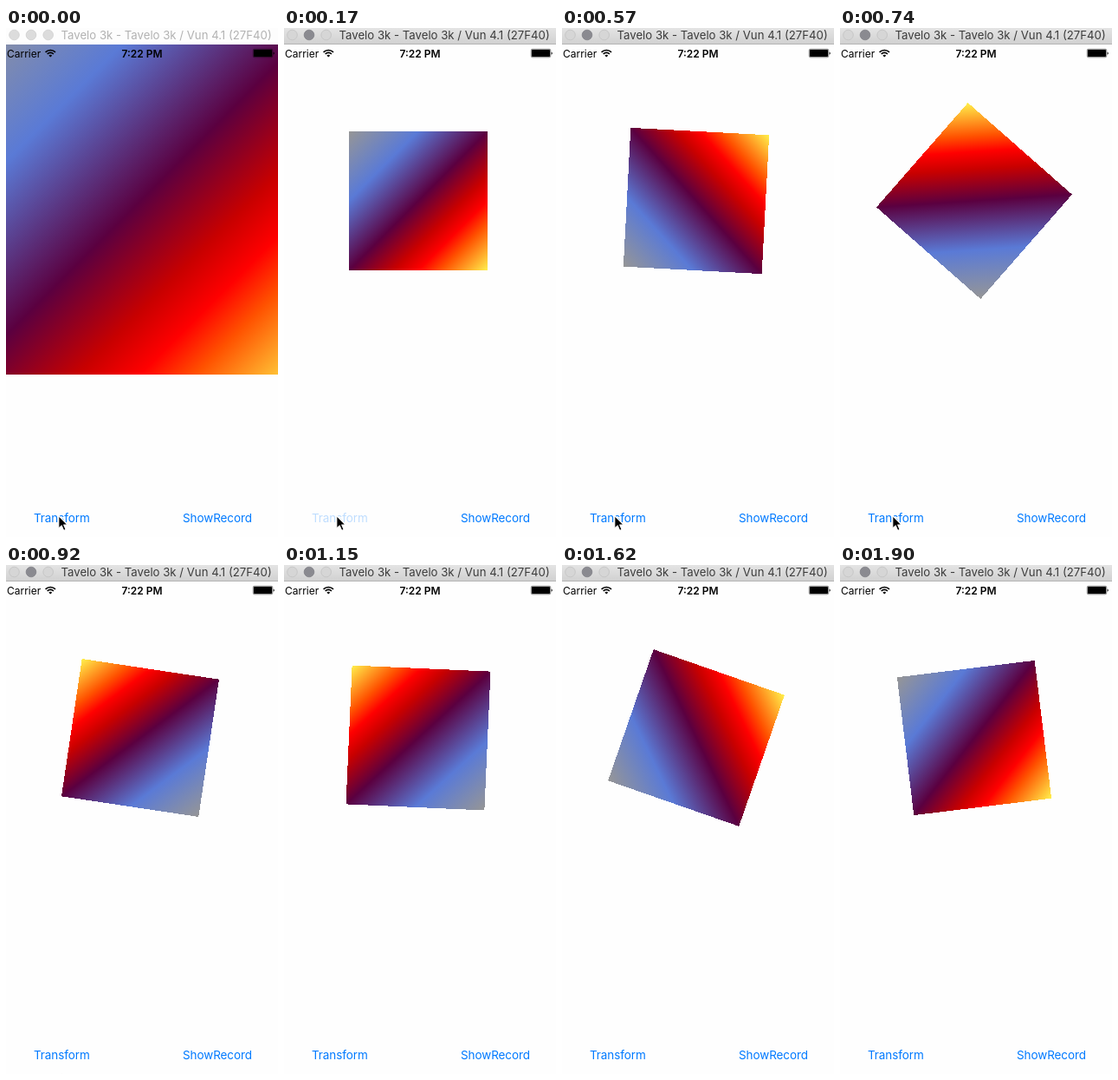
An HTML page for the animation above (2 s loop, 314 by 586 pixels).

```html
<!DOCTYPE html>
<html lang="en">
<head>
<meta charset="utf-8">
<title>Gradient transform</title>
<style>
  html, body { margin: 0; width: 100%; height: 100%; overflow: hidden; background: #fff; }
  svg { display: block; width: 314px; height: 586px; }
  text { font-family: Inter, "Liberation Sans", sans-serif; font-size: 12px; white-space: pre; }
  .title { font-size: 13.2px; fill: #b2b2b2; }
  .clock { font-weight: 600; text-anchor: middle; }
  .button { font-size: 13.5px; letter-spacing: -.1px; fill: #007aff; }
  .lights circle { fill: #dcdcdc; stroke: #d0d0d0; stroke-width: .8; }
  .bar { fill: #fdfdfd; }
  .rule { fill: none; }

  .active .bar { fill: url(#chrome); }
  .active .rule { fill: #b4b4b4; }
  .active .title { fill: #3c3c3c; }
  .active .lights circle { fill: #d6d6d6; stroke: #c2c2c2; }
  .active .lights .mid { fill: #8a8a90; stroke: #828288; }
</style>
</head>
<body>
<svg id="stage" viewBox="0 0 314 586">
  <defs>
    <linearGradient id="colors" x1="0" y1="0" x2="1" y2="1">
      <stop offset="0" stop-color="#969696"/>
      <stop offset=".25" stop-color="#5a7ad6"/>
      <stop offset=".5" stop-color="#5b0040"/>
      <stop offset=".66" stop-color="#c80000"/>
      <stop offset=".75" stop-color="#f00"/>
      <stop offset=".83" stop-color="#ff5200"/>
      <stop offset="1" stop-color="#fff04c"/>
    </linearGradient>
    <linearGradient id="chrome" x1="0" y1="0" x2="0" y2="1">
      <stop offset="0" stop-color="#e4e4e4"/>
      <stop offset="1" stop-color="#d0d0d0"/>
    </linearGradient>
  </defs>

  <rect width="314" height="586" fill="#fefefe"/>
  <rect id="square" x="-80" y="-80" width="160" height="160" fill="url(#colors)" shape-rendering="crispEdges"/>

  <rect class="bar" width="314" height="19"/>
  <rect class="rule" y="18" width="314" height="1"/>
  <g class="lights">
    <circle cx="9.5" cy="8" r="5.8"/>
    <circle class="mid" cx="29" cy="8" r="5.8"/>
    <circle cx="48.7" cy="8" r="5.8"/>
  </g>
  <text class="title" x="63.5" y="13">Tavelo 3k - Tavelo 3k / Vun 4.1 (27F40)</text>

  <text x="1" y="33.5">Carrier</text>
  <g fill="none" stroke="#000" stroke-width="1.7">
    <path d="M45.6 27.9a8 8 0 0 1 11.4 0"/>
    <path d="M47.7 30a5 5 0 0 1 7.2 0"/>
    <path d="M51.3 33.6l-1.9-1.9a2.7 2.7 0 0 1 3.8 0z" fill="#000" stroke="none"/>
  </g>
  <text class="clock" x="157" y="33.5">7:22 PM</text>
  <rect x="285.25" y="24.25" width="22.5" height="9.5" rx="1.6" fill="none" stroke="#000" stroke-width=".5"/>
  <rect x="286" y="25" width="21" height="8" rx=".8"/>
  <path d="M308.6 27.4a1.8 1.8 0 0 1 0 3.4z"/>

  <text id="transform" class="button" x="32" y="569">Transform</text>
  <text class="button" x="204" y="569">ShowRecord</text>

  <path id="cursor" d="M0 0V14.6L3.4 11.4L5.8 17L8.3 15.9L5.9 10.5H10.4Z"
        fill="#000" stroke="#fff" stroke-width="1.1" stroke-linejoin="round"/>
</svg>
<script>
  const LOOP = 2000;
  const TAP = 120;           // ms, the hard switch from the enlarged square
  // Motion is measured in evenly spaced steps counted from the tap.
  const SPIN = -.25, TURN = 16.58, END = 33.33;
  const FADE = 8.2;          // steps until the tapped label is solid again
  const LEAVE = 11;          // step at which the pointer moves off the stage
  const byId = id => document.getElementById(id);
  const progress = (v, from, to) => Math.min(1, Math.max(0, (v - from) / (to - from)));

  // Each step stays for 60 ms, a few for 50 ms.
  const shortSteps = new Set([2, 4, 7, 9, 14, 20, 27, 29]);
  const starts = [TAP];
  for (let i = 0; i < 31; i++) starts.push(starts[i] + (shortSteps.has(i) ? 50 : 60));

  // -1 before the tap
  const stepAt = t => starts.filter(s => s <= t).length - 1;

  // cubic-bezier(.42, 0, .58, 1)
  function ease(x) {
    let lo = 0, hi = 1;
    for (let i = 0; i < 24; i++) {
      const s = (lo + hi) / 2, r = 1 - s;
      if (1.26 * r * r * s + 1.74 * r * s * s + s ** 3 < x) lo = s; else hi = s;
    }
    return lo * lo * (3 - 2 * lo);
  }

  const angle = step =>
    -180 * (ease(progress(step, SPIN, TURN)) - ease(progress(step, TURN, END)));

  function draw(step) {
    const active = step >= 0;
    byId("stage").classList.toggle("active", active);
    byId("square").setAttribute("transform",
      `translate(155 199) ${active ? `rotate(${angle(step)})` : "scale(2.5)"}`);

    const fade = progress(step, SPIN, FADE);
    byId("transform").setAttribute("opacity", active ? 1 - .8 * (1 - fade) ** 2 : 1);

    const away = progress(step, LEAVE, LEAVE + 3.5);
    byId("cursor").setAttribute("transform", `translate(${60.8 + 4 * away} ${561.5 + 30 * away ** 1.5})`);
  }

  const start = performance.now();
  function tick() {
    draw(stepAt((performance.now() - start) % LOOP));
    requestAnimationFrame(tick);
  }
  tick();
</script>
</body>
</html>
```
